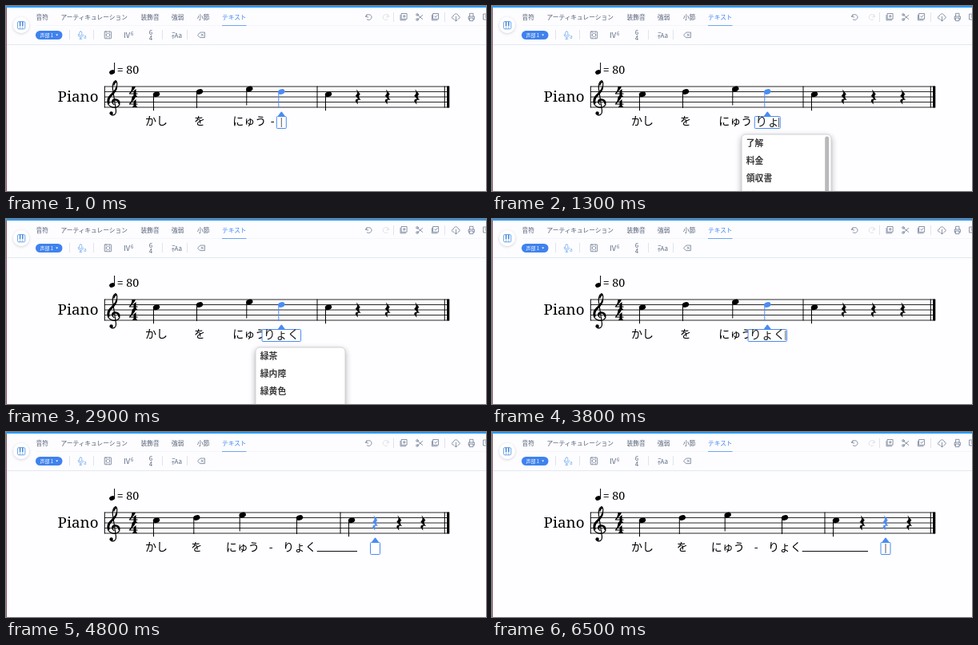
Write an HTML page that moves like this. It is 600 px wide and 232 px high and loops after 6.6 s.

```html
<!DOCTYPE html>
<html lang="ja">
<head>
<meta charset="utf-8">
<title>歌詞の入力</title>
<style>
html, body { margin: 0; width: 100%; height: 100%; overflow: hidden; background: #fefdff; }
svg { display: block; }
text { font-family: "Noto Sans CJK JP", "Noto Sans CJK", sans-serif; white-space: pre; }
.serif { font-family: "Noto Serif", serif; font-weight: 500; }
.tabs text { font-size: 7.7px; font-weight: 500; fill: #505c75; }
.tabs .on { fill: #4285f4; }
.icons { fill: none; stroke: #66738c; stroke-width: .75; stroke-linecap: round; stroke-linejoin: round; }
.icons text { fill: #5c6982; stroke: none; }
.mid { text-anchor: middle; }
.lyric { font-size: 14px; font-weight: 500; text-anchor: middle; }
.entry { font: 15px "Noto Serif", "Noto Sans CJK JP", "Noto Sans CJK", serif; text-anchor: middle; fill: #222; }
.menu text { font-size: 10.8px; font-weight: 700; fill: #3a3a3a; }
</style>
</head>
<body>
<svg width="600" height="232" viewBox="0 0 600 232">
  <defs>
    <filter id="shade" x="-20%" y="-20%" width="140%" height="150%">
      <feDropShadow dx="0" dy=".8" stdDeviation="1.4" flood-color="#446" flood-opacity=".28"/>
    </filter>
    <filter id="lift" x="-20%" y="-20%" width="140%" height="150%">
      <feDropShadow dx="0" dy="3" stdDeviation="3.6" flood-color="#333" flood-opacity=".42"/>
    </filter>
    <g id="note">
      <ellipse rx="4.3" ry="3.2" transform="rotate(-20)"/>
      <path d="M-3.5 1V20.5" stroke="currentColor" stroke-width="1"/>
    </g>
    <path id="rest" stroke="currentColor" stroke-width=".4" d="M-1.8-9L2.6-3.4C.4-1.2.6.6 3.2 4C.4 2.8-1.6 4-.2 9C-4.6 5.4-3.4 2 .8 3L-3-1.4C-.4-3.8-.2-5.8-1.8-9z"/>
    <path id="four" d="M3.5 0H8C6.5 4 3.5 6.5 1.5 8.6H5.5V5.5L8.6 3V8.6H10.6V9.6H8.6C8.6 11.4 9 12 10 12.2V13H4V12.2C5.2 12 5.5 11.4 5.5 9.6H0V8.6C2.4 6 3.4 3 3.5 0z"/>
  </defs>

  <!-- toolbar -->
  <path d="M0 0H600V48H0z" fill="#fdfdff"/>
  <path d="M38 24.5H600" stroke="#f3f5fa"/>
  <path d="M0 48.5H600" stroke="#e2e9f3"/>
  <path d="M0 0H600V2H0z" fill="#2b9bf4"/>
  <path d="M.5 2V232" stroke="#86596a"/>
  <circle cx="19" cy="24" r="10" fill="#fff" filter="url(#shade)"/>
  <rect x="14.6" y="19.6" width="9.2" height="9.2" rx="1.4" fill="#fff" stroke="#5b9be0" stroke-width=".9"/>
  <path d="M17.6 19.5v5.6M20.8 19.5v5.6" stroke="#3f86dc" stroke-width="1.5"/>
  <path d="M17.6 25v4M20.8 25v4" stroke="#5b9be0" stroke-width=".6"/>

  <g class="tabs">
    <text x="37.5" y="16.8">音符</text>
    <text x="68.5" y="16.8">アーティキュレーション</text>
    <text x="168.5" y="16.8">装飾音</text>
    <text x="207" y="16.8">強弱</text>
    <text x="239" y="16.8">小節</text>
    <text x="270" y="16.8" class="on">テキスト</text>
  </g>
  <path d="M270 24.5H300.5" stroke="#6fa6f6"/>

  <rect x="37" y="31" width="33.5" height="11" rx="5.5" fill="#3f82ee"/>
  <text x="42.5" y="38.7" font-size="6" font-weight="500" fill="#fff">声部 1</text>
  <path d="M62.2 35.6h3l-1.5 1.8z" fill="#fff"/>

  <path d="M79.5 30v12M109.5 30v12M195.5 30v12M226.5 30v12M484.5 8v12M548.5 8v12" stroke="#e0e4ec"/>

  <g class="icons">
    <g stroke="#6ea8ee">
      <rect x="91.8" y="31.8" width="3" height="5.8" rx="1.5"/>
      <path d="M90.2 35.5C90.2 40.6 96.4 40.6 96.4 36M93.3 39.4V41.3M91.8 41.3h3"/>
      <text x="97" y="41" font-size="6.5" style="fill:#6ea8ee">a</text>
    </g>
    <rect x="123.2" y="32" width="8.4" height="8.8" rx=".8"/>
    <path d="M125.3 32v8.5M129.5 32v8.5" stroke-width=".5"/>
    <path d="M125.3 36.3h.1M127.4 34.4h.1M127.4 38.4h.1M129.5 36.3h.1" stroke-width="1.4"/>
    <text x="147" y="40" font-size="9.3">IV</text>
    <text x="156" y="36.8" font-size="6">6</text>
    <text x="181" y="35.8" font-size="8" class="mid">6</text>
    <text x="181" y="43" font-size="8" class="mid">4</text>
    <text x="210.4" y="40" font-size="8">Aa</text>
    <path d="M208.8 40.8V36.6M207.4 38l1.4-1.5 1.4 1.5M208 33.4h3" stroke-width=".7"/>
    <path d="M239.8 36.3l3-3.3h5.6v6.6h-5.6zM244 35l2.6 2.6M246.6 35l-2.6 2.6"/>

    <path d="M451.2 10.5l-1.7 2.8 3.2.7M449.8 13C451.3 9.5 457 10 457 14C457 17 453.5 18.5 451.2 16.8"/>
    <path stroke="#d3d8e2" d="M477 10.5l1.7 2.8-3.2.7M478.4 13C476.9 9.5 471.2 10 471.2 14C471.2 17 474.7 18.5 477 16.8"/>
    <path d="M494.5 9.5h6.6v6.8h-6.6zM493 11.5v6.3h6.6M497.8 11.4v3M496.3 12.9h3"/>
    <path d="M514.8 11.5l6 5M514.8 16.5l6-5"/>
    <circle cx="514" cy="10.9" r="1.3"/><circle cx="514" cy="17" r="1.3"/>
    <path d="M534 9.5h6.6v6.8H534zM532.5 11.5v6.3h6.6M535.6 12.9l1.3 1.3 2.2-2.6"/>
    <path d="M560 16.2h-.8C556.6 16 557 12.7 559.3 12.7C559.8 8.9 565 9 565.3 12.4C568 12.6 567.6 16 565.4 16.2H565M562.5 13.2v5.6M560.8 17.3l1.7 1.7 1.7-1.7"/>
    <path d="M579.6 13V9.3h4.4V13M579.6 16.6h-1.4V13h7.2v3.6H584M579.6 15h4.4v3.6h-4.4z"/>
    <path d="M597 10h6v7h-6zM599 12h4M599 14h4"/>
  </g>

  <!-- staff -->
  <ellipse cx="132.6" cy="83" rx="3.6" ry="2.7" transform="rotate(-22 132.6 83)"/>
  <path d="M135.6 82V71" stroke="#000"/>
  <text class="serif" x="138.7" y="85" font-size="14.2">= 80</text>
  <text class="serif" x="64.6" y="120" font-size="18.8">Piano</text>
  <path d="M123 101H554M123 107.5H554M123 114H554M123 120.5H554M123 127H554" stroke="#111" stroke-width=".9"/>
  <path d="M123.3 100.6V127.4M548.3 100.6V127.4" stroke="#000" stroke-width="1"/>
  <path d="M552.7 100.6V127.4" stroke="#000" stroke-width="3.2"/>
  <g fill="none" stroke="#000" stroke-width="1.2" stroke-linecap="round">
    <path d="M134.8 123.4C131.8 122 131.8 117.6 135.4 116.9C140 116.2 143 119.8 142 123.2C140.8 127.3 135.6 128.2 131.6 126.4C126 123.8 125.6 117.6 129.2 113.2C132.4 109.3 137.4 106 138.5 101C139.2 97.6 138.3 94.6 137 93.6C134 95.4 132.8 100 133.5 104.5L137.5 131C138.1 135.4 134.6 138 131.6 136.4"/>
    <path d="M128.6 121.8C127.4 117.8 129.4 114.4 132 111.8C135 108.8 137.6 106 138.2 102" stroke-width="2.1"/>
    <path d="M133.4 120.6C133.4 118.4 135 117.5 137 117.7C139.6 118 141.2 119.8 141.2 122" stroke-width="2.1"/>
    <path d="M134.8 98.6C135.6 96.6 136.4 95.6 137.4 95.2" stroke-width="1.8"/>
  </g>
  <circle cx="131.6" cy="134.4" r="2.2"/>
  <use href="#four" x="154" y="101"/>
  <use href="#four" x="154" y="114"/>

  <g id="score"></g>
  <g id="entry"></g>
  <g id="menu" class="menu"></g>
</svg>
<script>
const LOOP = 6600, BLUE = '#4a8cf2';
const NOTE_Y = [110.75, 107.5, 104, 107.5, 110.75];

// x of five notes, then three rests
const WIDE = { x: [188, 242, 304.3, 344.3, 403, 440, 477, 513.5], bar: 389, dash: 333.2 };
const SUNG = { x: [188, 238.3, 295.7, 367, 432, 461.5, 491.5, 521.5], bar: 418, dash: 331.3 };
const HELD = { x: [188, 237.8, 294.7, 366, 430, 463, 492, 521.5], bar: 416, dash: 330.3 };

const BOX = { '': 12, r: 12, 'り': 17, 'りょ': 32, 'りょk': 43.5, 'りょく': 48.5 };
const RYO = ['了解', '料金', '領収書', '料理'];
const RYOK = ['緑茶', '旅行中', '旅行者'];
const RYOKU = ['緑茶', '緑内障', '緑黄色'];

// each step overrides what came before it
const STEPS = [
  [0, { at: WIDE, sel: 3, text: '', caret: true, menu: null, bar: true }],
  [300, { caret: false }],
  [1000, { text: 'r', caret: true }],
  [1100, { text: 'り' }],
  [1200, { text: 'りょ', menu: RYO }],
  [1500, { text: 'りょk' }],
  [1600, { menu: RYOK }],
  [2000, { caret: false }],
  [2300, { text: 'りょく', caret: true }],
  [2400, { menu: RYOKU, bar: false }],
  [2900, { caret: false }],
  [3300, { caret: true }],
  [3800, { menu: null }],
  [4300, { caret: false }],
  [4400, { at: SUNG, sel: 4, text: '', caret: true }],
  [4700, { sel: 5, caret: false }],
  [5100, { caret: true }],
  [5300, { at: HELD, sel: 6 }],
  [5800, { caret: false }],
  [6300, { caret: true }]
];

const $ = id => document.getElementById(id);
const lyric = (x, s) => `<text class="lyric" x="${x}" y="149">${s}</text>`;

function drawScore({ at, sel, text }) {
  const { x, bar, dash } = at;
  let out = x.map((cx, i) => {
    const color = i === sel ? BLUE : '#000';
    const [id, y] = i < 5 ? ['note', NOTE_Y[i]] : ['rest', 114];
    return `<use href="#${id}" x="${cx}" y="${y}" fill="${color}" color="${color}"/>`;
  }).join('');
  out += `<path d="M${bar} 100.6V127.4" stroke="#000"/>`;
  out += ['かし', 'を', 'にゅう'].map((s, i) => lyric(x[i], s)).join('');
  if (text.length < 2) out += lyric(dash, '-');
  if (sel > 3) out += lyric(x[3], 'りょく');
  if (sel > 4) out += `<path d="M${x[3] + 21.7} 149.6H${x[sel - 1] + 7}" stroke="#000"/>`;
  $('score').innerHTML = out;
}

function drawEntry({ at, sel, text, caret }) {
  const cx = at.x[sel], w = BOX[text];
  const end = text ? cx + w / 2 - 1.8 : cx;
  let out = `<path d="M${cx - 4.8} 138.5L${cx - .8} 133Q${cx} 132 ${cx + .8} 133L${cx + 4.8} 138.5z" fill="${BLUE}"/>
    <rect x="${cx - w / 2}" y="138.5" width="${w}" height="15" rx="1" fill="#fff" stroke="${BLUE}" stroke-width="1"/>
    <text class="entry" x="${cx}" y="150.3">${text}</text>`;
  if (caret) out += `<path d="M${end} 140V152" stroke="#333" stroke-width=".8"/>`;
  $('entry').innerHTML = out;
}

function drawMenu({ menu, bar }) {
  if (!menu) return $('menu').innerHTML = '';
  let out = '<rect x="312" y="161" width="112" height="90" rx="5" fill="#fff" stroke="#c4c4c8" stroke-width=".8" filter="url(#lift)"/>';
  if (bar) out += '<rect x="416.2" y="163.5" width="5" height="90" rx="2.5" fill="#b9b9bb"/>';
  out += menu.map((s, i) => `<text x="317.8" y="${176.2 + i * 21.8}">${s}</text>`).join('');
  $('menu').innerHTML = out;
}

let shown = -1;
function frame() {
  const t = performance.now() % LOOP;
  const n = STEPS.filter(([start]) => start <= t).length;
  if (n !== shown) {
    shown = n;
    const state = Object.assign({}, ...STEPS.slice(0, n).map(step => step[1]));
    drawScore(state);
    drawEntry(state);
    drawMenu(state);
  }
  requestAnimationFrame(frame);
}
frame();
</script>
</body>
</html>
```
